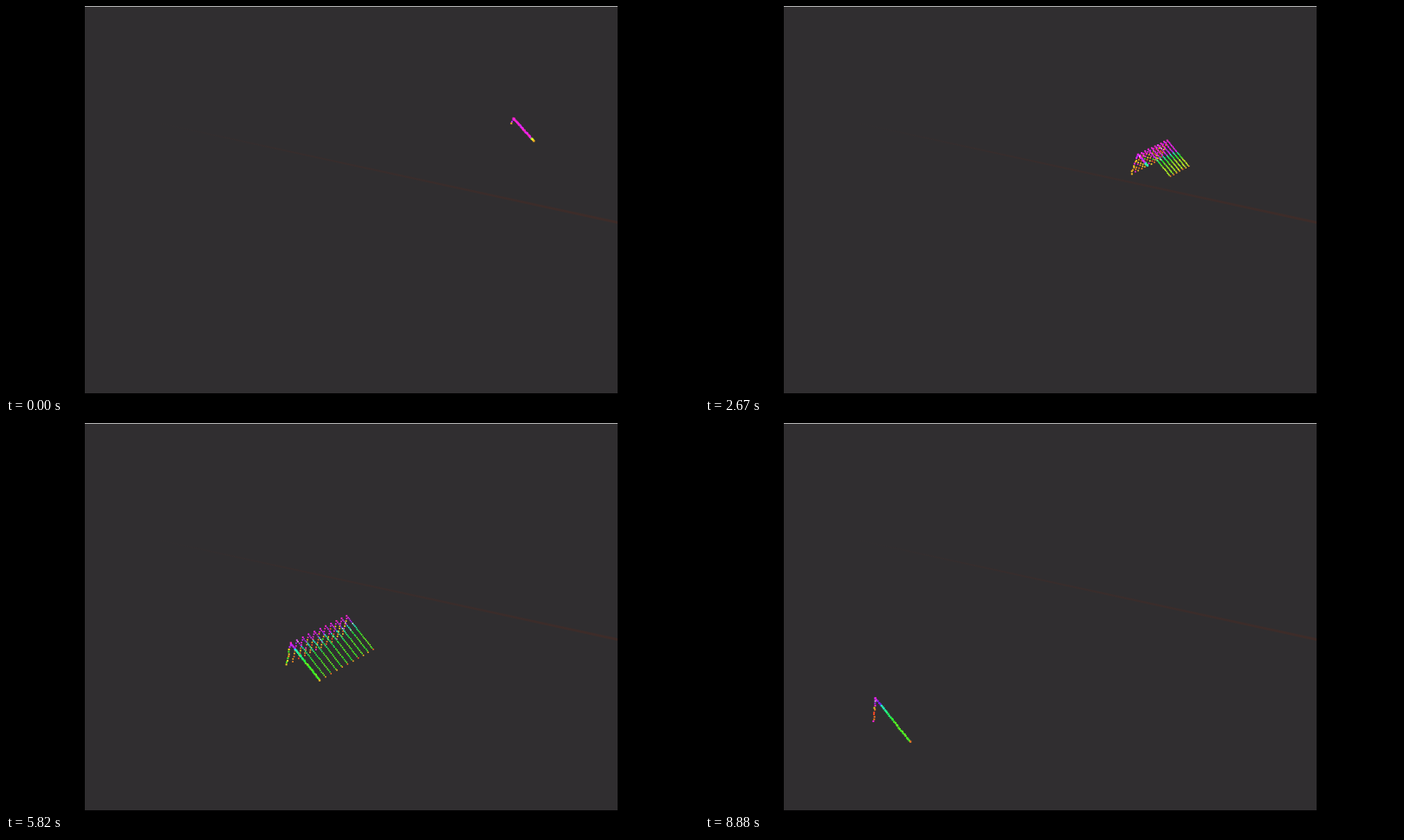
These frames come from a looping animation (800 by 450 pixels, 8910 ms). An HTML page with a canvas:

```html
<!DOCTYPE html>
<html lang="en">
<head>
<meta charset="utf-8">
<title>Roof scan</title>
<style>
  html, body { margin: 0; width: 100%; height: 100%; overflow: hidden; background: #000; }
  canvas { display: block; width: 800px; height: 450px; }
</style>
</head>
<body>
<canvas id="stage" width="800" height="450"></canvas>
<script>
const ctx = document.getElementById('stage').getContext('2d');
const LOOP = 8910, TICK = 30;
const STEP = 0.1, LIFE = 1.04, STOP = 7.33;

// Perspective tracks: start x, y, their rates, and the depth rate.
const RIDGE = [586, 130, -66.1, 4.67, -0.0661];
const LEFT = [577, 151, -65, 3.71, -0.066];
const RIGHT = [609, 156, -66.2, 5, -0.0652];

const project = ([x, y, vx, vy, q], t) => [(x + vx * t) / (1 + q * t), (y + vy * t) / (1 + q * t)];
const mix = (a, b, u) => a + (b - a) * u;
const clamp = (v, lo, hi) => Math.min(hi, Math.max(lo, v));

function random(seed) {
  let s = Math.imul(seed + 1, 0x9e3779b1);
  return () => {
    s = (s + 0x6d2b79f5) | 0;
    let r = Math.imul(s ^ (s >>> 15), 1 | s);
    r ^= r + Math.imul(r ^ (r >>> 7), 61 | r);
    return ((r ^ (r >>> 14)) >>> 0) / 4294967296;
  };
}

function rightHue(u, t, r) {
  const top = 0.12 + 0.75 * Math.exp(-t / 2);
  if (u > 0.97) return 15 + 30 * r;
  if (u < top) return mix(305, 255, clamp(t / 7, 0, 1) * u / top) + 30 * (r - 0.5);
  const low = clamp(58 + t * 10, 58, 110);
  return mix(175, low, Math.min(1, (u - top) / (1 - top) * 2)) + 24 * (r - 0.5);
}

function leftHue(u, r) {
  if (u < 0.25) return 275 + 50 * r;
  if (r < 0.12) return 310;
  if (r > 0.92) return 110;
  return 60 * r;
}

function drawLeg(from, to, count, reach, size, spread, hue, rand) {
  for (let i = 0; i <= count; i++) {
    const u = i / count, r = rand(), jx = rand() - 0.5, jy = rand() - 0.5;
    if (u > reach) break;
    const x = mix(from[0], to[0], u) + jx * spread;
    const y = mix(from[1], to[1], u) + jy * spread;
    const light = u < 0.5 && rand() > 0.95 ? 85 : 56;
    ctx.fillStyle = `hsl(${hue(u, r)}, 95%, ${light}%)`;
    ctx.fillRect(x - size / 2, y - size / 2, size, size);
  }
}

function drawScan(t, seed, front) {
  const rand = random(seed);
  const ridge = project(RIDGE, t);
  const leftReach = clamp(0.36 + t * 2, 0, 1);
  // A few scans lose the lower part of the right slope.
  const gap = t > 2.35 && t < 2.75;
  const rightReach = gap ? clamp(0.15 + (t - 2.5) * 2.5, 0.1, 1) : 1;
  const size = front ? 2.3 : 1.6;
  const spread = front ? 0.8 : 0.5;
  drawLeg(ridge, project(LEFT, t), front ? 10 : 8, leftReach, front ? 2 : 1.7, spread + 0.4, leftHue, rand);
  drawLeg(ridge, project(RIGHT, t), front ? 30 : 23, rightReach, size, spread, (u, r) => rightHue(u, t, r), rand);
}

const glow = ctx.createLinearGradient(175, 0, 706, 0);
glow.addColorStop(0, 'rgba(60, 44, 42, 0)');
glow.addColorStop(0.3, 'rgba(60, 44, 42, .55)');
glow.addColorStop(1, 'rgba(62, 44, 41, 1)');

function drawBackdrop() {
  ctx.fillStyle = '#000';
  ctx.fillRect(0, 0, 800, 450);
  ctx.fillStyle = '#302e30';
  ctx.fillRect(91, 0, 615, 448);
  ctx.fillStyle = '#b4b4b4';
  ctx.fillRect(91, 0, 615, 1);
  ctx.fillStyle = glow;
  ctx.beginPath();
  ctx.moveTo(175, 134.5);
  ctx.lineTo(706, 249);
  ctx.lineTo(706, 252);
  ctx.lineTo(175, 136);
  ctx.fill();
}

function draw(now) {
  const tick = Math.floor((now % LOOP) / TICK);
  const t = tick * TICK / 1000;
  const latest = Math.floor(t / STEP + 1e-6);
  const last = Math.min(latest, Math.floor(STOP / STEP));
  drawBackdrop();
  for (let k = 0; k <= last; k++) {
    if (k < latest && t - k * STEP <= LIFE) drawScan(k * STEP, k, false);
  }
  drawScan(Math.min(latest * STEP, STOP), 1000 + tick, true);
}

function run(now) {
  draw(now);
  requestAnimationFrame(run);
}
draw(0);
requestAnimationFrame(run);
</script>
</body>
</html>
```
